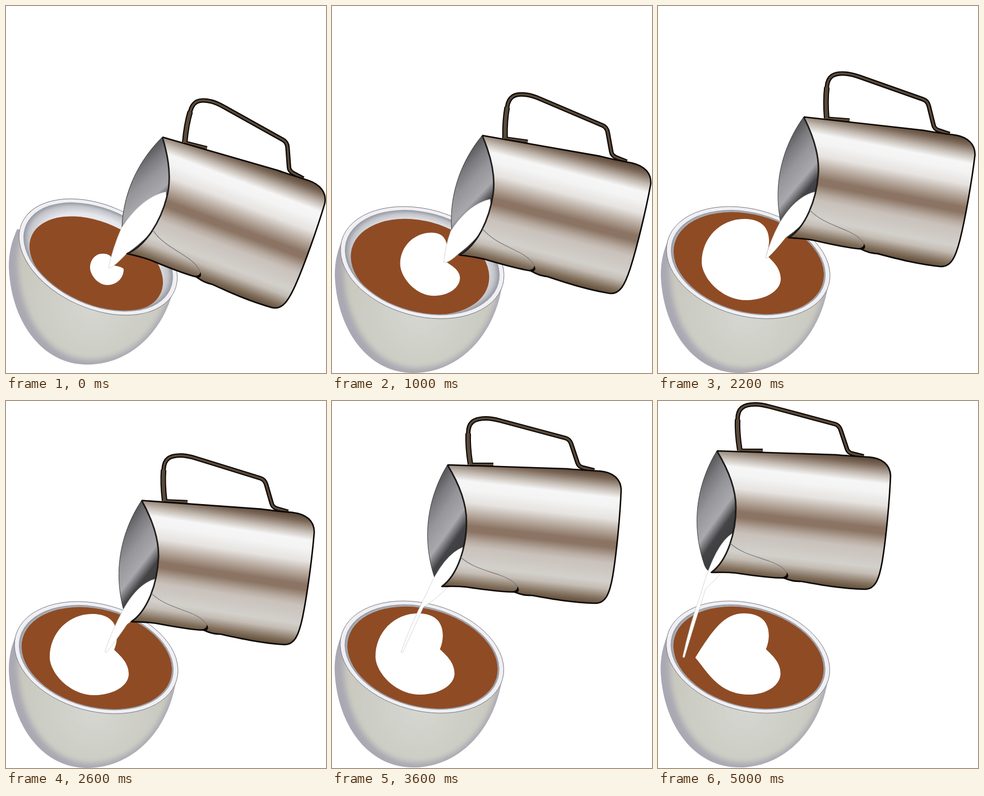
Write an HTML page that moves like this. It is 571 px wide and 655 px high and loops after 5200 ms.

```html
<!DOCTYPE html>
<html lang="en">
<head>
<meta charset="utf-8">
<title>Latte art</title>
<style>
  html, body { margin: 0; width: 100%; height: 100%; overflow: hidden; background: #fff; }
  svg { display: block; width: 100%; height: 100%; }
</style>
</head>
<body>
<svg viewBox="0 0 571 655">
  <defs>
    <linearGradient id="steel" gradientUnits="userSpaceOnUse" x1="245" y1="95" x2="216.4" y2="347">
      <stop offset="0" stop-color="#4c3928"/><stop offset=".06" stop-color="#7a6656"/>
      <stop offset=".13" stop-color="#c2b9b0"/><stop offset=".19" stop-color="#f6f6f6"/>
      <stop offset=".25" stop-color="#f4f4f4"/><stop offset=".34" stop-color="#e6e3e0"/>
      <stop offset=".4" stop-color="#c4b9b0"/><stop offset=".5" stop-color="#8b7463"/>
      <stop offset=".54" stop-color="#8b7463"/><stop offset=".61" stop-color="#b8aca2"/>
      <stop offset=".65" stop-color="#c9c1bb"/><stop offset=".78" stop-color="#d3d0cb"/>
      <stop offset=".83" stop-color="#c4bdb5"/><stop offset=".9" stop-color="#857360"/>
      <stop offset=".97" stop-color="#4c3a28"/>
    </linearGradient>
    <linearGradient id="hollow" gradientUnits="userSpaceOnUse" x1="206" y1="114" x2="296" y2="178">
      <stop offset="0" stop-color="#555558"/><stop offset=".18" stop-color="#7a7a7e"/>
      <stop offset=".38" stop-color="#96959a"/><stop offset=".63" stop-color="#a9a8ad"/>
      <stop offset=".8" stop-color="#444446"/><stop offset="1" stop-color="#3c3c3e"/>
    </linearGradient>
    <radialGradient id="wall">
      <stop offset="0" stop-color="#f6f6f9"/><stop offset=".8" stop-color="#e6e7ec"/>
      <stop offset=".93" stop-color="#c3c5cb"/><stop offset="1" stop-color="#9598a0"/>
    </radialGradient>
    <radialGradient id="glaze" gradientUnits="userSpaceOnUse" cx="150" cy="540" r="150">
      <stop offset="0" stop-color="#d5d7d1"/><stop offset="1" stop-color="#c8c8be"/>
    </radialGradient>
    <filter id="soft" x="-20%" y="-20%" width="140%" height="140%"><feGaussianBlur stdDeviation="5"/></filter>
    <path id="bowl" d="M20 398C10 420 5 440 5 465C8 560 62 640 145 640C225 640 290 575 304 481Z"/>
    <clipPath id="bowlClip"><use href="#bowl"/></clipPath>
    <clipPath id="rimClip"><ellipse id="rimEdge"/></clipPath>
    <path id="mouth" d="M196 331C225 310 240 260 240 215C240 185 228 150 206 114"/>
    <path id="shell" d="M206 114L420 121C440 123 460 124 478 125C500 127 515 138 516 158C514 205 508 270 501 312C496 340 490 361 470 361C430 360 395 354 357 347C345 347 338 346 326 341C300 341 260 335 240 332C220 330 208 331 196 331"/>
    <path id="leg" d="M247 113Q242 82 243 58"/>
    <path id="grip" d="M243 66V58C243 39 252 31 275 31Q285 31 300 35L416 66Q424 68 427 77L438 110Q440 117 448 119L468 124"/>
    <path id="foot" d="M246 113.500H288"/>
  </defs>

  <g id="cup">
    <g id="base">
      <use href="#bowl" fill="#aaa8b2"/>
      <g clip-path="url(#bowlClip)">
        <use href="#bowl" fill="url(#glaze)" filter="url(#soft)" transform="translate(16 1) scale(.935 .985)"/>
      </g>
    </g>
    <ellipse id="rim" fill="#f0f0f4" stroke="#77777f" stroke-width=".9"/>
    <ellipse id="inner" fill="url(#wall)"/>
    <g clip-path="url(#rimClip)"><ellipse id="coffee" fill="#8f4b24"/></g>
    <path id="foam" fill="#fff"/>
  </g>

  <path class="jug" d="M206 114C184 150 152 225 184 318Q188 328 196 331C225 310 240 260 240 215C240 185 228 150 206 114Z"
        fill="url(#hollow)" stroke="#333" stroke-width=".9"/>
  <path id="milk" fill="#fff" stroke="#c4c4c4" stroke-width=".7" stroke-linejoin="round"/>
  <g class="jug" fill="none" stroke-linejoin="round">
    <g stroke="#0c0805">
      <use href="#leg" stroke-width="10"/>
      <use href="#grip" stroke-width="8"/>
      <use href="#foot" stroke-width="7"/>
    </g>
    <g stroke="#5a4a3a">
      <use href="#leg" stroke-width="6"/>
      <use href="#grip" stroke-width="3.600"/>
      <use href="#foot" stroke-width="3.500"/>
    </g>
    <use href="#shell" fill="url(#steel)" stroke="#0c0805" stroke-width="2.600"/>
    <path d="M196 331L206 114" stroke="none"/>
    <use href="#mouth" fill="url(#hollow)" fill-opacity="0" stroke="#333" stroke-width=".9"/>
    <path d="M230 279C250 297 275 302 300 311Q326 320 332 334" stroke="#77777b" stroke-width="1.200"/>
    <path d="M321 340Q331 339 331 331Q337 339 328 343Z" fill="#0c0805"/>
  </g>
</svg>
<script>
const STEP = 200, STEPS = 26;
const $ = id => document.getElementById(id);
const jugs = document.querySelectorAll('.jug');
const mix = (a, b, k) => a + (b - a) * k;
const mid = (a, b, dx = 0, dy = 0) => [(a[0] + b[0]) / 2 + dx, (a[1] + b[1]) / 2 + dy];
const ramp = (step, from, to) => Math.min(1, Math.max(0, (step - from) / (to - from)));

// The jug's rim corner and tilt, and the stream's left bend, tip and right bend.
const pours = [
  { step: 0, jug: [279, 234, 14.2], left: [206, 396], tip: [183, 467], right: [215, 442] },
  { step: 6, jug: [265.8, 230.4, 6.9], left: [213, 403], tip: [203, 455], right: [227, 443] },
  { step: 11, jug: [260, 198, 4.5], left: [217, 387], tip: [192, 449], right: [228, 413] },
  { step: 15, jug: [224, 157, 0], left: [200, 360], tip: [161, 446], right: [204, 384] },
  { step: 18, jug: [206, 114, 0], left: [168, 345], tip: [123, 448], right: [163, 368] },
  { step: 22, jug: [156, 89, 0], left: [108, 345], tip: [74, 461], right: [118, 362] },
  { step: 25, jug: [105, 89, 0], left: [76, 345], tip: [44, 457], right: [85, 335] }
];

// Extreme points of the heart; point is how sharp its left end is.
const heart = { notch: [193, 444], top: [154, 380], left: [78, 457], bottom: [157, 525], right: [219, 487], point: [0] };
const foams = [
  { step: 0, notch: [188, 462], top: [172, 442], left: [150, 467], bottom: [181, 498], right: [210, 470], point: [0] },
  { step: 6, notch: [204, 454], top: [179, 397], left: [116, 459], bottom: [182, 521], right: [232, 488], point: [0] },
  { step: 11, ...heart },
  { step: 18, ...heart },
  { step: 25, ...heart, left: [67, 459], bottom: [163, 525], point: [1] }
];

function at(keys, step) {
  const i = Math.max(1, keys.findIndex(key => key.step >= step));
  const a = keys[i - 1], b = keys[i], k = ramp(step, a.step, b.step), pose = {};
  for (const name in a) {
    if (name !== 'step') pose[name] = a[name].map((v, n) => mix(v, b[name][n], k));
  }
  return pose;
}

function foamPath({ notch: [nx, ny], top: [tx, ty], left: [lx, ly], bottom: [bx, by], right: [rx, ry], point: [p] }) {
  const ARC = .56, h = ny - ty, w = tx - lx, w2 = bx - lx;
  return `M${nx} ${ny}
    C${nx + .14 * h} ${ny - .33 * h} ${nx + .18 * h} ${ty} ${tx} ${ty}
    C${tx - mix(ARC, .41, p) * w} ${ty} ${lx + .36 * p * w} ${mix(ly, ty, mix(ARC, .63, p))} ${lx} ${ly}
    C${lx + .24 * p * w2} ${mix(ly, by, mix(.4, .41, p))} ${bx - ARC * w2} ${by} ${bx} ${by}
    C${mix(bx, rx, ARC)} ${by} ${rx} ${mix(ry, by, ARC)} ${rx} ${ry}
    C${rx} ${mix(ny, ry, .5)} ${mix(nx, rx, .27)} ${mix(ny, ry, .17)} ${nx} ${ny}Z`;
}

// The stream starts at the milk level on the jug's mouth, which sinks as it pours.
function milkPath({ jug: [x, y, angle], left, tip, right }, step) {
  const a = angle * Math.PI / 180, u = 30, v = mix(93, 146, ramp(step, 0, 15));
  const top = [x + u * Math.cos(a) - v * Math.sin(a), y + u * Math.sin(a) + v * Math.cos(a)];
  const bend = [mix(left[0], top[0], .45), mix(top[1], left[1], .15)];
  const end = [tip[0] + 3, tip[1] + 1];
  return `M${top}Q${bend} ${left}Q${mid(left, tip, -4)} ${tip}
    L${end}Q${mid(end, right, -2, 5)} ${right}Q${mid(top, right).with(0, top[0] + 8)} ${top}Z`;
}

function ellipse(id, cx, cy, rx, ry, angle) {
  const attrs = { cx, cy, rx, ry, transform: `rotate(${angle} ${cx} ${cy})` };
  for (const name in attrs) $(id).setAttribute(name, attrs[name]);
}

function draw(step) {
  const turn = ramp(step, 0, 5), fill = ramp(step, 5, 11), lift = ramp(step, 15, 18);
  const rim = inset => ellipse(inset.id, 164.5 - 3.5 * turn, 448 + 10 * turn,
    149 - inset.x, 92 + 3.4 * turn - inset.y, mix(24.2, 15.3, turn));
  $('cup').setAttribute('transform', `translate(${-.4 * lift} ${-lift})`);
  $('base').setAttribute('transform', `translate(0 ${15 * turn})`);
  rim({ id: 'rim', x: 0, y: 0 });
  rim({ id: 'inner', x: 8, y: 6 });
  rim({ id: 'rimEdge', x: 11, y: 7.5 });
  ellipse('coffee', 161 - 4 * turn + 5 * fill, 461 + 4.5 * turn - 6.5 * fill,
    126 + 11 * fill, 75 + 7 * turn + 5 * fill, mix(24, 15, turn));
  $('foam').setAttribute('d', foamPath(at(foams, step)));

  const pour = at(pours, step), [x, y, angle] = pour.jug;
  $('milk').setAttribute('d', milkPath(pour, step));
  for (const jug of jugs) {
    jug.setAttribute('transform', `translate(${x} ${y}) rotate(${angle}) translate(-206 -114)`);
  }
}

// Fill the body along the mouth's curve rather than straight across.
$('shell').setAttribute('d', $('shell').getAttribute('d') + $('mouth').getAttribute('d').replace(/^M196 331/, ''));

const start = performance.now();
function tick() {
  draw(Math.floor((performance.now() - start) / STEP) % STEPS);
  requestAnimationFrame(tick);
}
tick();
</script>
</body>
</html>
```
